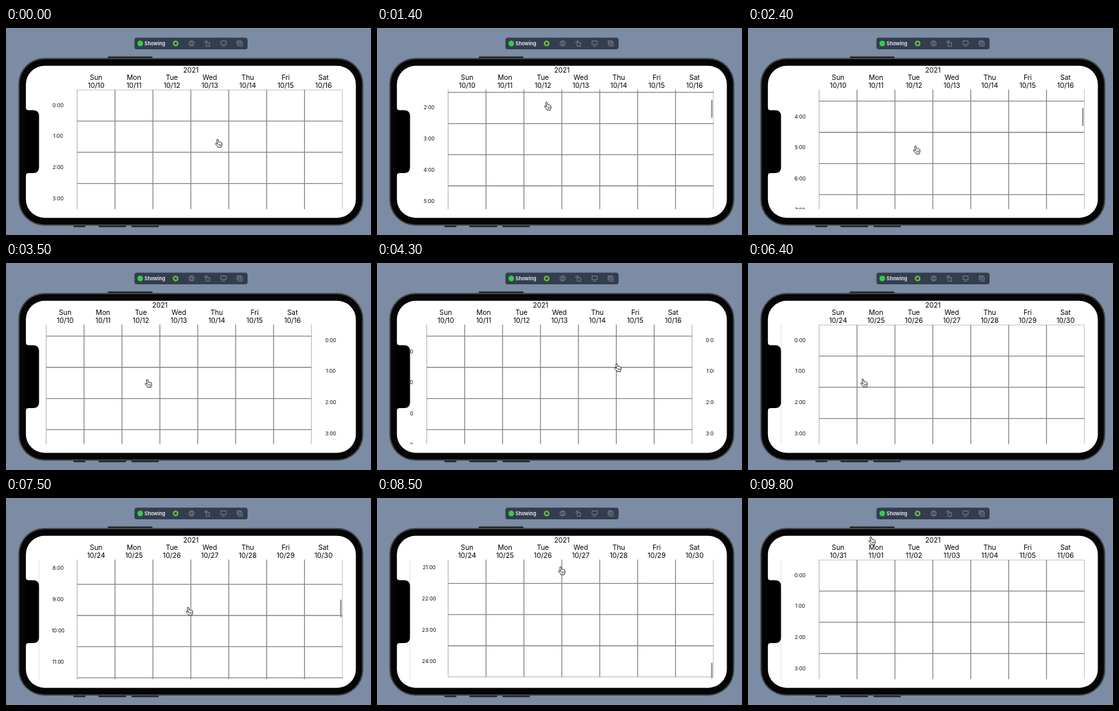
Animation of 547 by 311 pixels, one loop 9900 ms. Source, as an HTML page:

```html
<!DOCTYPE html>
<html lang="en">
<head>
<meta charset="utf-8">
<title>Week calendar</title>
<style>
html, body { margin: 0; width: 100%; height: 100%; overflow: hidden; background: #7c8ca4; }
svg { display: block; width: 547px; height: 311px; font-family: Inter, Roboto, sans-serif; }
.head { font-size: 10.3px; text-anchor: middle; fill: #000; }
.hour { font-size: 7.5px; text-anchor: middle; fill: #000; }
.inner { stroke: #858585; stroke-width: 1.3; }
.outer { stroke: #989898; stroke-width: .8; }
.icon { fill: none; stroke: #8d95a3; stroke-width: .8; }
</style>
</head>
<body>
<svg id="stage" viewBox="0 0 547 311">
  <defs>
    <clipPath id="headClip"><rect x="49.5" y="56" width="455.2" height="36.5"/></clipPath>
    <clipPath id="bodyClip"><rect x="49.5" y="92.5" width="455.2" height="179.8"/></clipPath>
  </defs>
  <rect width="547" height="311" fill="#7c8ca4"/>

  <!-- toolbar -->
  <rect x="192.5" y="14.5" width="169.5" height="17.5" rx="3.5" fill="#333d4d"/>
  <circle cx="201.2" cy="23.2" r="4.2" fill="#35cc4b"/>
  <text x="207.6" y="26" font-size="7.4" font-weight="600" fill="#f1f3f5">Showing</text>
  <circle cx="254.2" cy="23.2" r="4.3" fill="#62bd3c"/>
  <rect x="252.5" y="21.5" width="3.4" height="3.4" rx=".6" fill="#333d4d"/>
  <g class="icon">
    <circle cx="278.2" cy="23.2" r="4"/>
    <rect x="276.8" y="20.7" width="2.8" height="5" rx=".7"/>
    <path d="M300 22h5v5.5h-5zM298 22.5v-2.500h3.500M300.200 18.500l1.500 1.500-1.500 1.500"/>
    <path d="M322.200 19.500h7.800v5.500h-7.800zM324 27.300h4.200"/>
    <path d="M346.300 25.300v-6h5.800v1.700M348 21h6v6.200h-6zM351 22.600v3M349.500 24.100h3"/>
  </g>

  <!-- phone -->
  <g fill="#24272b">
    <rect x="152.500" y="42.700" width="67" height="4" rx="1"/>
    <rect x="101" y="295" width="18" height="4.300" rx="1"/>
    <rect x="138.500" y="295" width="41.500" height="4.300" rx="1"/>
    <rect x="188" y="295" width="41" height="4.300" rx="1"/>
  </g>
  <rect x="18.500" y="45" width="517" height="252" rx="39" fill="#414345"/>
  <rect x="20.500" y="47" width="513" height="248" rx="37" fill="#050505"/>
  <rect x="29.800" y="56.800" width="494.500" height="228.400" rx="28" fill="#fff"/>
  <path d="M29 119.500h.8q0 4 4 4h6.700q9 0 9 9v76.500q0 9-9 9h-6.700q-4 0-4 4h-.8z" fill="#000"/>

  <g id="heads" clip-path="url(#headClip)"></g>
  <g id="bodies" clip-path="url(#bodyClip)"></g>
  <g id="bars" clip-path="url(#bodyClip)"></g>

  <g id="hand" stroke="#111" stroke-width=".9" stroke-linejoin="round" stroke-linecap="round">
    <path fill="#fff" d="M-1.900 1.300L-3.100-3.900Q-3.300-5.700-2-5.800Q-1-5.800-.8-4.500L-.2-1.700Q.9-2.300 1.500-1.300Q2.600-1.900 3.200-.9Q4.600-1.200 4.800.5L4.900 2Q4.800 3.600 4 4.800L3.800 6.200H-1.200L-1.400 5.200Q-3.500 3.200-5 1.300Q-5.400.3-4.400 0Q-3.200-.2-1.900 1.300Z"/>
    <path fill="none" stroke-width=".6" d="M-.1 1.700l.3 2.200M1.500 1.600l.1 2.200M3 1.500v2.200"/>
  </g>
</svg>
<script>
const LOOP = 9900, STEP = 100;
const PAGE = 455, LEFT = 106.6, COL = 56.8, TOP = 93, ROW = 46.85;
const VIEW = 179.3, HOURS = 25, MAX = HOURS * ROW - VIEW;
const RIGHT = LEFT + 7 * COL;
const DAYS = ['Sun', 'Mon', 'Tue', 'Wed', 'Thu', 'Fri', 'Sat'];

const $ = id => document.getElementById(id);
function add(parent, tag, attrs, text) {
  const el = document.createElementNS('http://www.w3.org/2000/svg', tag);
  for (const k in attrs) el.setAttribute(k, attrs[k]);
  if (text) el.textContent = text;
  return parent.appendChild(el);
}
const line = (g, x1, y1, x2, y2, edge) =>
  add(g, 'line', { x1, y1, x2, y2, class: edge ? 'outer' : 'inner' });

function makePage(p) {
  const head = add($('heads'), 'g', { class: 'head' });
  add(head, 'text', { x: 277, y: 66.6 }, '2021');
  DAYS.forEach((day, i) => {
    const x = LEFT + (i + .5) * COL;
    const date = new Date(2021, 9, 10 + 7 * p + i);
    const label = date.getMonth() + 1 + '/' + String(date.getDate()).padStart(2, '0');
    add(head, 'text', { x, y: 78.3 }, day);
    add(head, 'text', { x, y: 90.2 }, label);
  });

  const body = add($('bodies'), 'g', {});
  for (let i = 0; i <= HOURS; i++) {
    const y = TOP + i * ROW;
    line(body, LEFT, y, RIGHT, y, i % HOURS === 0);
    if (i < HOURS) add(body, 'text', { x: 78, y: y + 25.6, class: 'hour' }, i + ':00');
  }
  for (let i = 0; i <= 7; i++) {
    const x = LEFT + i * COL;
    line(body, x, TOP, x, TOP + HOURS * ROW, i % 7 === 0);
  }
  const bar = add($('bars'), 'rect', { x: 500.7, width: 2.1, rx: 1, fill: '#8f8f8f' });
  return { head, body, bar };
}
const pages = [0, 1, 2, 3].map(makePage);

const ease = {
  lin: u => u,
  in: u => u * u,
  out: u => 1 - (1 - u) ** 3,
  both: u => u * u * (3 - 2 * u)
};
// keys: [time, value, easing towards this key]
function track(keys, t) {
  if (t <= keys[0][0]) return keys[0][1];
  for (let i = 1; i < keys.length; i++) {
    const [t1, v1, e = 'lin'] = keys[i], [t0, v0] = keys[i - 1];
    if (t <= t1) return v0 + (v1 - v0) * ease[e]((t - t0) / (t1 - t0));
  }
  return keys[keys.length - 1][1];
}

const swipe = [
  [3000, 0], [3400, -110, 'both'], [3800, 0, 'out'], [4100, 0],
  [4300, -32, 'in'], [4600, -348], [5000, -455, 'out'], [5400, -455],
  [5600, -514.5, 'in'], [5900, -725], [6300, -910, 'out'], [8900, -910],
  [9000, -919], [9300, -1170], [9700, -1365, 'out']
];
const scrolls = {
  0: [[400, 0], [700, 90, 'both'], [800, 90], [1100, 30, 'both'], [1400, 90, 'in'], [2200, 170.5, 'out']],
  2: [[6700, 0], [6900, 110, 'in'], [7400, 330, 'out'], [7600, 440], [8000, 690, 'out'],
    [8200, 800], [8400, 998, 'out'], [8500, 995.4], [8700, MAX, 'out']]
};
const shows = {
  0: [[400, 0], [500, 1], [2400, 1], [2500, 0]],
  2: [[6700, 0], [6800, 1], [8600, 1], [8800, 0]]
};
// pointer: [time, x, y, easing]
const pointer = [
  [0, 319, 173], [300, 262, 207, 'both'], [400, 262, 207], [700, 260, 117, 'both'],
  [800, 260, 117], [1100, 259, 177, 'both'], [1400, 256, 117, 'in'], [2000, 253, 183, 'both'],
  [2600, 253, 183], [2900, 313, 185, 'both'], [3000, 313, 185], [3400, 203, 182, 'both'],
  [4100, 393, 158, 'both'], [4300, 361, 157, 'in'], [4600, 45, 165], [4700, 45, 165],
  [5400, 435, 172, 'both'], [5600, 375, 173, 'in'], [5900, 165, 178], [6400, 174, 180],
  [6700, 272, 225, 'both'], [6900, 274, 115, 'in'], [7400, 274, 225, 'both'], [7600, 276, 115],
  [8000, 276, 215, 'both'], [8200, 277, 110], [8500, 277, 109], [8900, 440, 90, 'both'],
  [9000, 431, 88], [9300, 180, 66], [9800, 186, 64, 'out']
];
const handX = pointer.map(([t, x, y, e]) => [t, x, e]);
const handY = pointer.map(([t, x, y, e]) => [t, y, e]);

const move = (el, x, y) => el.setAttribute('transform', `translate(${x} ${y})`);

function draw(t) {
  const shift = track(swipe, t);
  pages.forEach(({ head, body, bar }, p) => {
    const x = p * PAGE + shift;
    const s = scrolls[p] ? track(scrolls[p], t) : 0;
    move(head, x, 0);
    move(body, x, -s);
    const over = Math.max(0, s - MAX);
    const size = 27 - over;
    move(bar, x, 94.5 + Math.min(s / MAX, 1) * (VIEW - 30) + over);
    bar.setAttribute('height', size);
    bar.setAttribute('opacity', shows[p] ? track(shows[p], t) : 0);
  });
  move($('hand'), track(handX, t), track(handY, t));
}

const start = performance.now();
function tick() {
  const t = (performance.now() - start) % LOOP;
  draw(Math.floor(t / STEP) * STEP);
  requestAnimationFrame(tick);
}
tick();
</script>
</body>
</html>
```
